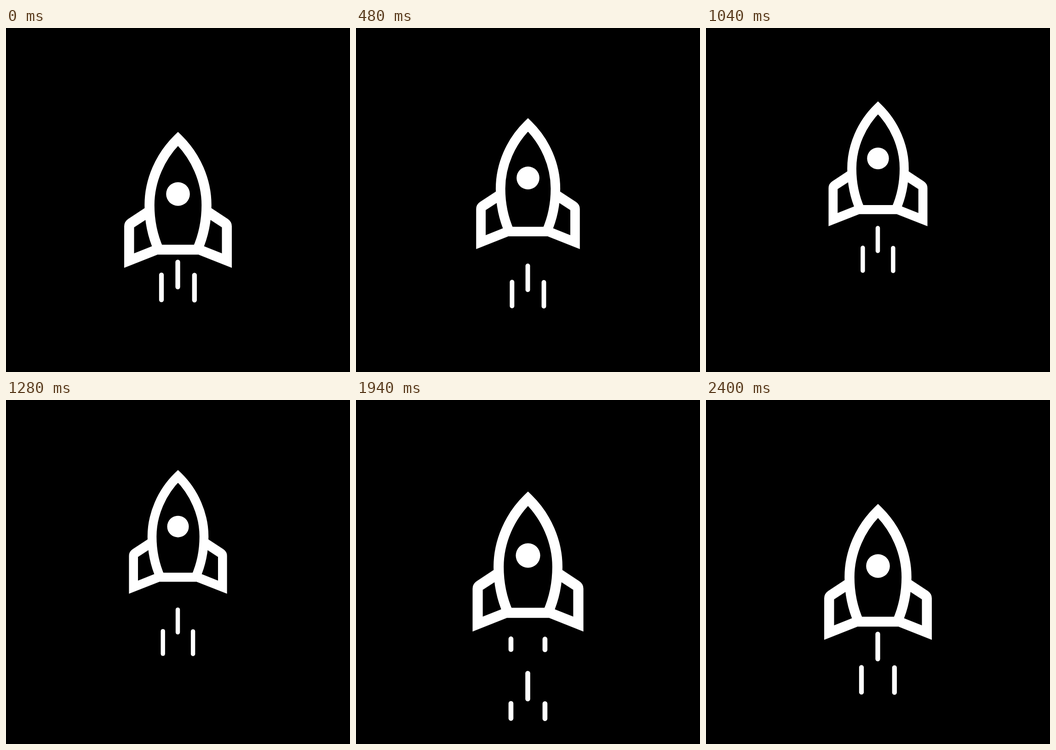
An HTML page that plays this animation: 748x748 px, repeating every 2460 ms.

```html
<!DOCTYPE html>
<html lang="en">
<head>
<meta charset="utf-8">
<title>Rocket</title>
<style>
  html, body { margin: 0; width: 100%; height: 100%; overflow: hidden; background: #000; }
  svg { display: block; width: 748px; height: 748px; }
  .dash { stroke-width: 10.3; stroke-linecap: round; stroke-dasharray: 54 114; }
</style>
</head>
<body>
<svg viewBox="0 0 748 748">
  <g id="rocket" fill="#fff" stroke="none">
    <path id="fin" fill-rule="evenodd"
      d="M310 386 L266 415 Q257 421 257 431 V521.5 L329 493 Z M310 413 L278.5 433.5 V490 L325 471.5 Z"/>
    <use href="#fin" transform="translate(748) scale(-1 1)"/>
    <path fill="none" stroke="#fff" stroke-width="21.5" stroke-miterlimit="10"
      d="M374 241 C335 279 312 332 312 385 C312 420 320 455 332 482 H416
         C428 455 436 420 436 385 C436 332 413 279 374 241 Z"/>
    <circle cx="374" cy="361" r="25.8"/>
    <g stroke="#fff">
      <path class="dash" data-speed="0.8585" d="M338 537 v167.9"/>
      <path class="dash" data-speed="0.84" d="M373.5 509 v167.9"/>
      <path class="dash" data-speed="0.8585" d="M409.8 537.5 v167.9"/>
    </g>
  </g>
</svg>
<script>
const LOOP = 2460, STEP = 20, END = 2400, PEAK = 1200, PERIOD = 168;
const rocket = document.getElementById('rocket');
const dashes = [...document.querySelectorAll('.dash')];

// Monotone cubic curve through [time, value] points
function curve(points) {
  const slopes = points.slice(1).map(([t, v], i) => (v - points[i][1]) / (t - points[i][0]));
  const tangents = points.map((_, i) => {
    const a = slopes[i - 1] ?? slopes[i], b = slopes[i] ?? a;
    return a * b > 0 ? 2 * a * b / (a + b) : 0;
  });
  return time => {
    let i = 0;
    while (i < points.length - 2 && time > points[i + 1][0]) i++;
    const [t0, v0] = points[i], [t1, v1] = points[i + 1];
    const h = t1 - t0, u = (time - t0) / h, w = 1 - u;
    return v0 * w * w * (1 + 2 * u) + v1 * u * u * (3 - 2 * u)
      + h * u * w * (tangents[i] * w - tangents[i + 1] * u);
  };
}

const fallScale = curve([[PEAK, .9046], [1260, .911], [1620, .981], [1920, 1.03],
  [2060, 1.042], [2160, 1.037], [END, 1]]);
const fallShift = curve([[PEAK, -92.3], [1260, -87], [1620, -52.5], [1920, -22.5],
  [2160, -1.5], [END, 0]]);

function draw(now) {
  const t = Math.floor(now % LOOP / STEP) * STEP;
  const time = t >= END ? END : Math.max(0, t - STEP);
  const rising = time < PEAK, rise = time / PEAK;
  const scale = rising ? 1 - .0954 * rise : fallScale(time);
  const shift = rising ? -92.3 * rise : fallShift(time);
  rocket.setAttribute('transform',
    `translate(374 ${374 + shift}) scale(${scale}) translate(-374 -374)`);
  for (const dash of dashes) {
    dash.style.strokeDashoffset = PERIOD - time * dash.dataset.speed % PERIOD;
  }
}

const start = performance.now();
function tick() {
  draw(performance.now() - start);
  requestAnimationFrame(tick);
}
tick();
</script>
</body>
</html>
```
